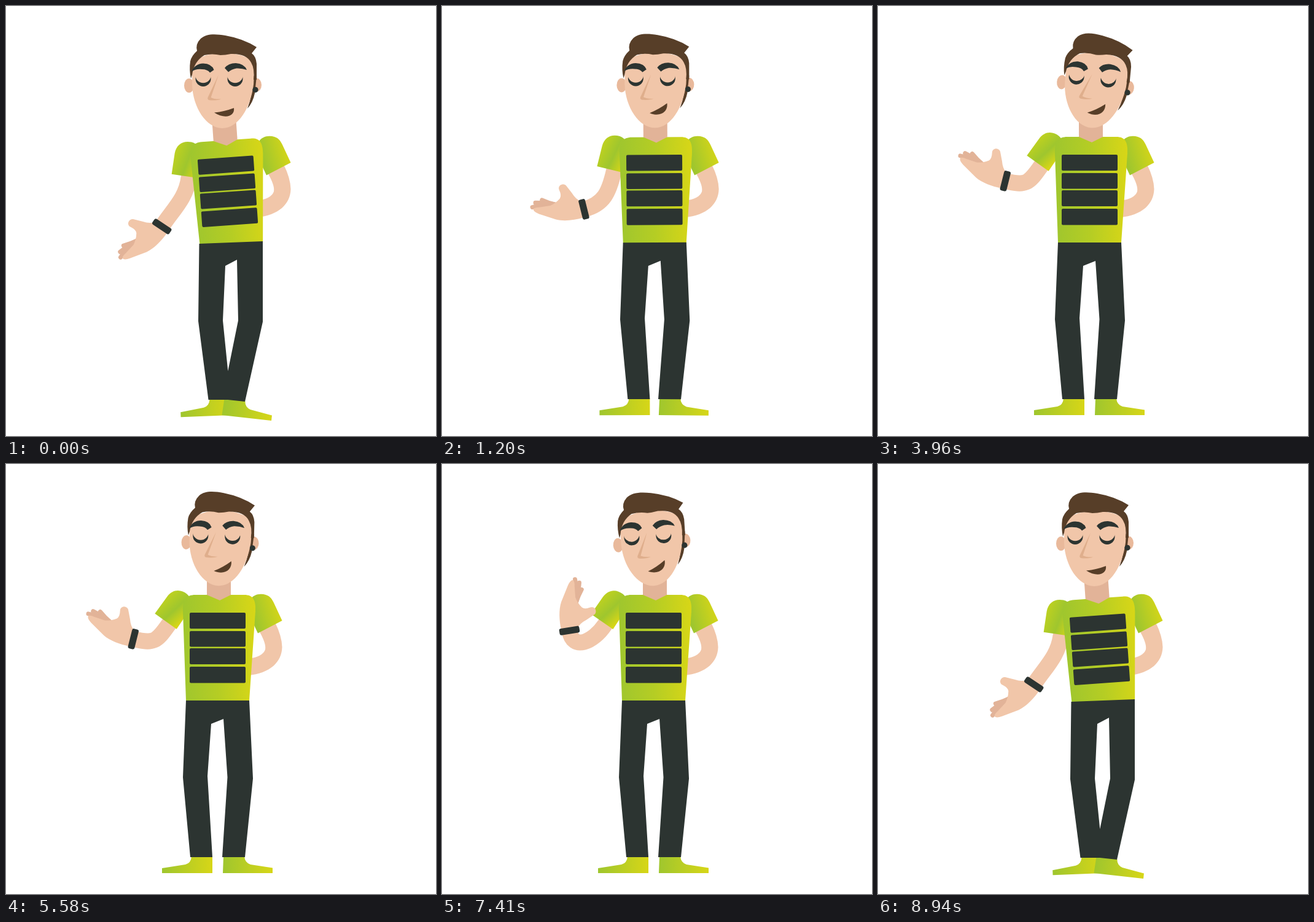
An HTML page with a canvas for the animation above (8970 ms loop, 700x700 px).

```html
<!DOCTYPE html>
<html lang="en">
<head>
<meta charset="utf-8">
<title>Talking man</title>
<style>
html, body { margin: 0; width: 100%; height: 100%; overflow: hidden; background: #fff; }
canvas { display: block; width: 700px; height: 700px; }
</style>
</head>
<body>
<canvas id="stage" width="700" height="700"></canvas>
<script>
const ctx = document.getElementById('stage').getContext('2d');
const LOOP = 8970, TURN = 4515, STEP = 30, RAD = Math.PI / 180;
const DARK = '#2c3431', HAIR = '#573e28', SKIN = '#f1c6a9', SHADE = '#e2b398';
const GREEN = '#9fc62e', YELLOW = '#d7d617';

const clamp = v => Math.max(0, Math.min(1, v));
const mix = (a, b, k) => a + (b - a) * k;
const mixPt = (a, b, k) => [mix(a[0], b[0], k), mix(a[1], b[1], k)];

function bezier(x1, x2, p) {
  if (p <= 0) return 0;
  if (p >= 1) return 1;
  let lo = 0, hi = 1, s = 0.5;
  for (let i = 0; i < 24; i++) {
    s = (lo + hi) / 2;
    const x = 3 * (1 - s) ** 2 * s * x1 + 3 * (1 - s) * s * s * x2 + s ** 3;
    if (x < p) lo = s; else hi = s;
  }
  return 3 * (1 - s) * s * s + s ** 3;
}
const ease = (t, from, to, x1, x2) => bezier(x1, x2, (t - from) / (to - from));

function turn([x, y], deg) {
  const c = Math.cos(deg * RAD), s = Math.sin(deg * RAD);
  return [x * c - y * s, x * s + y * c];
}
const add = (a, b) => [a[0] + b[0], a[1] + b[1]];

function fade(x0, y0, x1, y1, ...colors) {
  const g = ctx.createLinearGradient(x0, y0, x1, y1);
  colors.forEach((c, i) => g.addColorStop(i / (colors.length - 1), c));
  return g;
}
function fill(path, color) {
  ctx.fillStyle = color;
  ctx.fill(path);
}
function disc(x, y, rx, color, ry = rx) {
  ctx.fillStyle = color;
  ctx.beginPath();
  ctx.ellipse(x, y, rx, ry, 0, 0, 7);
  ctx.fill();
}
function box(x, y, w, h, r, color) {
  ctx.fillStyle = color;
  ctx.beginPath();
  ctx.roundRect(x, y, w, h, r);
  ctx.fill();
}
// Draws with local point (px, py) placed at `at`, turned by deg.
function placed(at, deg, px, py, draw, sy = 1) {
  ctx.save();
  ctx.translate(at[0], at[1]);
  ctx.rotate(deg * RAD);
  ctx.scale(1, sy);
  ctx.translate(-px, -py);
  draw();
  ctx.restore();
}

const shape = {
  footL: new Path2D('M302 639H336V666H254V658L292 652Q301 650 302 639Z'),
  footR: new Path2D('M354 639H388Q389 649 398 652L434 657.5V666H353Z'),
  shirt: new Path2D('M293.5 390L293 385L288 240C287 221 294 213 308 213H388C402 213 407 221 406 240L396 385L395.5 390Z'),
  neck: new Path2D('M327 180H366V213L348 222L327 213Z'),
  sleeveL: new Path2D('M-30 35L-29.5 1C-29 -14 -19 -22 -5 -21C6 -20 13 -10 13 2L13.5 35.5Z'),
  sleeveR: new Path2D('M397 222C402 212 414 210 423 213C430 215 433 220 436 226L449.5 255L410 275.5L398 250Z'),
  armR: new Path2D('M411 270Q424 292 422 302Q418 314 394 317V344C430 341 449 322 449.5 298Q449 280 438 258Z'),
  palm: new Path2D('M2 -13C20 -14 36 -12 48 -6L73 9Q82 15 80 19Q77 21 70 19.5L52 18Q42 20 34 26Q30 30 32 39C34 49 21 50 19 43L13 30Q9 18 2 14Z'),
  face: new Path2D('M303 90V128C304 165 326 199 352 199C378 199 398 166 403 128L405 90Q355 62 303 90Z'),
  hair: new Path2D('M301 118Q298 104 300 90Q302 81 311 73Q308 62 317 53C326 45 340 45 357 48Q386 53 408 67L400 77Q407 82 408 94V120H403Q405 102 399 92Q391 77 366 78Q357 80 349 80Q336 77 323 80Q306 90 303 112Z'),
  sideburn: new Path2D('M403 114H408L405 142Q402 157 393 167Q401 146 403 114Z'),
  browL: new Path2D('M302 107Q307 94 321 93.5Q335 94 338.5 104L332 108.5Q328 103 319 103Q309 102 302 107Z'),
  browR: new Path2D('M356 101Q362 93 374 93Q388 94 392 104Q384 101 375 101.5Q367 103 362 107.5Z'),
  nose: new Path2D('M346 112L328.5 149Q327 153.5 334 153.5Q344 154 350 151.5Q339 152 333.5 149Q339 133 346 112Z')
};

// Trouser outline: standing, then leaning.
const STAND = [[293, 385], [288, 510], [300, 640], [336, 640], [328, 508], [334, 423],
  [354, 415], [360.5, 510], [352, 640], [389, 640], [402, 512], [396, 385]];
const LEAN = [[314.5, 387], [313, 513], [329.5, 641], [366, 641], [353, 512], [357, 423],
  [376, 413], [378, 512], [352, 640], [389, 644], [418, 514], [418, 383]];

function drawLegs(u) {
  placed(mixPt([366.5, 666], [336, 666], u), mix(-2.2, 0, u), 336, 666, () =>
    fill(shape.footL, fade(254, 0, 336, 0, GREEN, YELLOW)));
  placed(mixPt([351.5, 666], [353, 666], u), mix(6.3, 0, u), 353, 666, () =>
    fill(shape.footR, fade(353, 0, 434, 0, GREEN, YELLOW)));
  ctx.fillStyle = DARK;
  ctx.beginPath();
  STAND.forEach((p, i) => ctx.lineTo(...mixPt(LEAN[i], p, u)));
  ctx.fill();
}

function drawRightArm(u) {
  placed([mix(14, 0, u), 0], 0, 0, 0, () => {
    fill(shape.armR, SKIN);
    fill(shape.sleeveR, fade(402, 240, 445, 228, GREEN, YELLOW));
  });
}

function drawFingers() {
  ctx.strokeStyle = SHADE;
  ctx.lineWidth = 7;
  ctx.lineCap = 'round';
  for (const [x, y] of [[63, 30], [74.5, 28], [81, 22]]) {
    ctx.beginPath();
    ctx.moveTo(42, 17);
    ctx.quadraticCurveTo(54, 23, x, y);
    ctx.stroke();
  }
}

function drawLeftArm(t, u) {
  const lift = ease(t, 1080, 1750, 0.45, 0.4);
  const k1 = clamp((t - 1020) / 180) ** 3;
  const k2 = 1 - (1 - clamp((t - 1200) / 440)) ** 3;
  const k3 = ease(t, 2520, 3120, 0.35, 0.2);
  const along = (a, b, c, d) => mix(mix(mix(a, b, k1), c, k2), d, k3);

  const shoulder = mixPt([304, 243], [287, 232], u * u);
  const upper = mix(7.6, 12, u) + 23 * lift;
  const fore = along(33.5 + 6 * u, 76, 171, 104) + 90;
  const at = p => add(shoulder, turn(p, upper));
  const wrist = at([along(-34.5, -35, -44, -35), along(121.5, 108, 77, 89)]);
  const cuff = at([-1.5, 37]);

  ctx.strokeStyle = SKIN;
  ctx.lineWidth = 26;
  ctx.lineCap = 'butt';
  ctx.lineJoin = 'round';
  ctx.beginPath();
  ctx.moveTo(...at([-1.5, 20]));
  ctx.lineTo(...cuff);
  ctx.bezierCurveTo(...add(cuff, turn([34, 0], upper + 90)),
    ...add(wrist, turn([-34, 0], fore)), ...wrist);
  ctx.stroke();

  placed(shoulder, upper, 0, 0, () =>
    fill(shape.sleeveL, fade(-30, 10, 14, 20, '#bbd021', GREEN, YELLOW)));
  placed(wrist, fore + along(4.5, 1, 0, 0), 0, 0, () => {
    drawFingers();
    fill(shape.palm, SKIN);
  });
  placed(wrist, fore, 0, 0, () => box(-5.5, -16.5, 11, 33, 3, DARK));
}

function drawTorso(u) {
  placed(mixPt([361, 301.5], [344.5, 299], u), mix(-4, 0, u), 344.5, 299, () => {
    fill(shape.shirt, fade(288, 0, 404, 0, GREEN, '#b5cd24', YELLOW));
    fill(shape.neck, SHADE);
    for (const [y, h] of [[242, 26], [272, 25.5], [300, 26], [330, 26.5]])
      box(299, y, 91, h, 2, DARK);
  }, mix(0.965, 1, u));
}

function drawMouth(u) {
  const [ax, ay] = mixPt([339, 173.5], [344, 175], u);
  const [bx, by] = mixPt([371, 166], [372, 158.5], u);
  ctx.fillStyle = HAIR;
  ctx.beginPath();
  ctx.moveTo(ax, ay);
  ctx.quadraticCurveTo((ax + bx) / 2 + 1, (ay + by) / 2 + 2, bx, by);
  ctx.bezierCurveTo(bx + 2, by + 14, ax + 17, ay + mix(11, 7, u), ax, ay);
  ctx.fill();
}

function drawHead(t, u) {
  const tilt = -14.5 * ease(t, 1050, 2600, 0.6, 0.3) + 20 * ease(t, 2560, 4100, 0.5, 0.3);
  placed(mixPt([352, 208], [345.6, 207.2], u * u), tilt, 352, 208, () => {
    disc(298, 129.5, 8, '#e9b99b', 11.5);
    disc(408, 128.5, 8, '#e9b99b', 11);
    fill(shape.sideburn, HAIR);
    fill(shape.face, SKIN);
    fill(shape.hair, HAIR);
    disc(406, 136.3, 4.6, DARK);
    for (const x of [321, 373]) {
      disc(x, 118.5, 12.5, DARK);
      disc(x, 112.5, 12.8, SKIN);
    }
    fill(shape.browL, DARK);
    fill(shape.browR, DARK);
    fill(shape.nose, '#dfae8c');
    drawMouth(u);
  });
}

function draw(now) {
  const time = Math.floor(now % LOOP / STEP) * STEP;
  const t = time > TURN ? 2 * TURN - time : time;
  const u = ease(t, 150, 1700, 0.8, 0.15);
  ctx.fillStyle = '#fff';
  ctx.fillRect(0, 0, 700, 700);
  drawRightArm(u);
  drawLeftArm(t, u);
  drawTorso(u);
  drawLegs(u);
  drawHead(t, u);
}

const start = performance.now();
function tick() {
  draw(performance.now() - start);
  requestAnimationFrame(tick);
}
tick();
</script>
</body>
</html>
```
